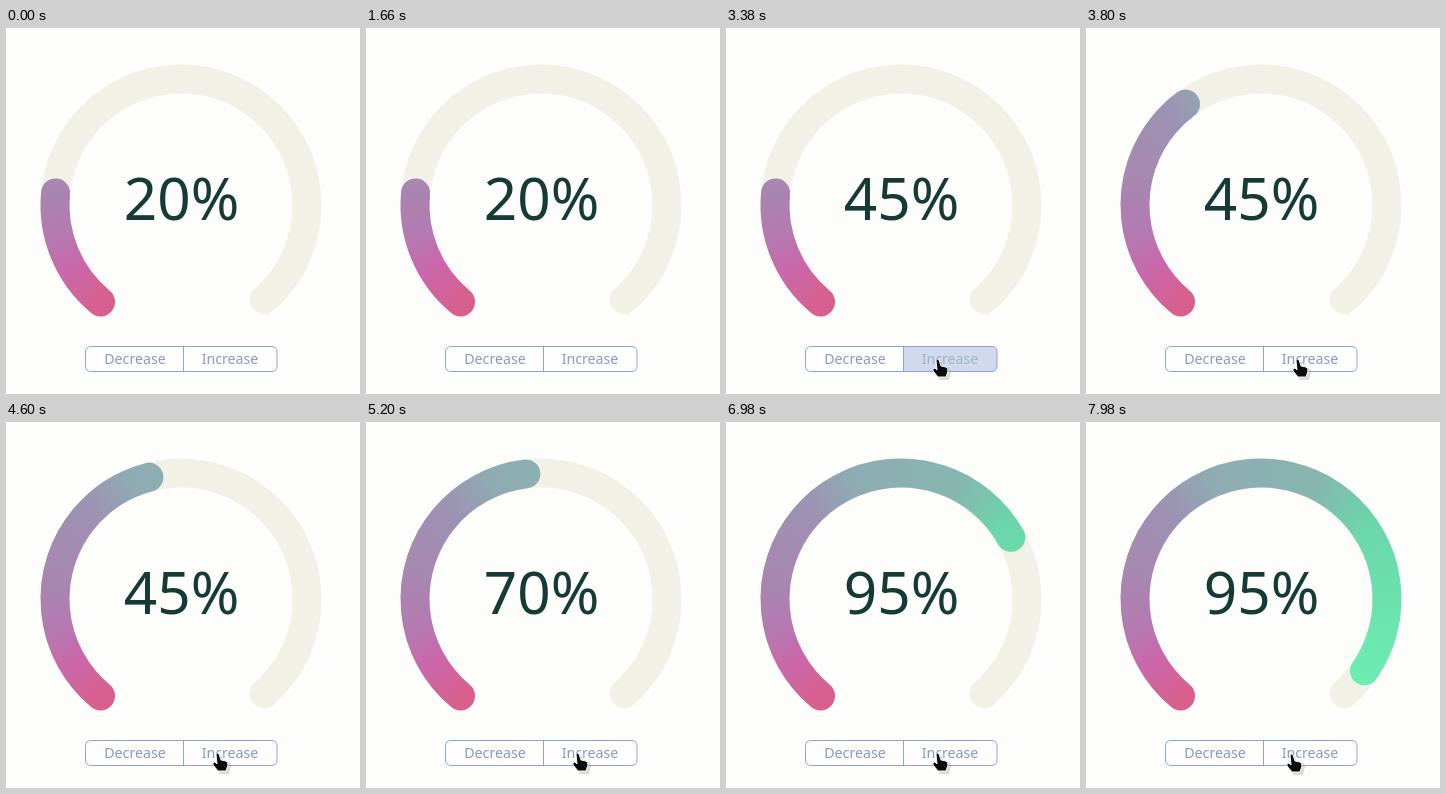
Recreate the animation shown at these times as an HTML page with a canvas. Size 354x366 px, loop 8000 ms.

```html
<!DOCTYPE html>
<html lang="en">
<head>
<meta charset="utf-8">
<title>Dashboard progress</title>
<style>
  html, body { margin: 0; width: 100%; height: 100%; overflow: hidden; background: #fdfdfc; }
  canvas, svg { position: absolute; left: 0; top: 0; display: block; }
  text { font-family: "Noto Sans", "Open Sans", sans-serif; text-anchor: middle; }
</style>
</head>
<body>
<canvas id="gauge" width="354" height="366"></canvas>
<svg width="354" height="366">
  <text id="label" x="175.5" y="192" font-size="58.5" fill="#163a36">20%</text>
  <path id="pressed" d="M177.5 318.5H266a5 5 0 0 1 5 5V338.5a5 5 0 0 1-5 5H177.5Z" fill="#d0d9ee"/>
  <g fill="none" stroke="#8fa0da">
    <rect x="79.5" y="318.5" width="191.5" height="25" rx="5"/>
    <path d="M177.5 318.5V343.5"/>
  </g>
  <g font-size="14.2" fill="#889ac4">
    <text x="129" y="336">Decrease</text>
    <text id="increase" x="224" y="336">Increase</text>
  </g>
  <g id="cursor" stroke-linejoin="round">
    <g id="hand">
      <path d="M-1 1Q1-1 2 1L4 6 10 7Q12 8 12 11L11 15 10 19H1L-4 12Q-6 9-3 9L0 11Z" fill="#778" opacity=".25" transform="translate(1 1)"/>
      <path d="M-2 0Q0-2 1 0L3 6 8 7Q10 8 10 11L9 14 8 17H0L-5 11Q-6 8-3 8L-1 10Z" fill="#0b0c0c" stroke="#f6f6f2"/>
    </g>
    <path id="arrow" d="M0 0V16L4 12.5 6.5 18 9 17 6.5 11.5H11.5Z" fill="#0b0c0c" stroke="#f6f6f2"/>
  </g>
</svg>
<script>
const LOOP = 8000, DURATION = 1000;
const CX = 175, CY = 177, RADIUS = 126, START = 129.7, SWEEP = 279;
const $ = id => document.getElementById(id);
const ctx = $('gauge').getContext('2d');

// press: button turns grey; move: bar starts, just after the label changes
const LABEL_LEAD = 60;
const clicks = [
  { press: 3200, move: 3400, value: 45 },
  { press: 4880, move: 5090, value: 70 },
  { press: 6600, move: 6890, value: 95 }
];
// time, x, y of the pointer tip
const route = [
  [1640, 166, 372], [1960, 238, 164], [2360, 212, 332],
  [7700, 212, 332], [7980, 206, 333]
];

const clamp = v => Math.max(0, Math.min(1, v));
const lerp = (a, b, p) => a + (b - a) * p;
const smooth = p => p * p * (3 - 2 * p);
const radians = degrees => degrees * Math.PI / 180;

// cubic-bezier(.25, .1, .25, 1)
function ease(x) {
  if (x <= 0 || x >= 1) return clamp(x);
  const bezier = (a, b, s) => 3 * a * s * (1 - s) ** 2 + 3 * b * s * s * (1 - s) + s ** 3;
  let lo = 0, hi = 1;
  for (let i = 0; i < 20; i++) {
    const mid = (lo + hi) / 2;
    if (bezier(.25, .25, mid) < x) lo = mid; else hi = mid;
  }
  return bezier(.1, 1, lo);
}

// The gradient begins a little early to cover the round cap.
const CAP = 15;
const paint = ctx.createConicGradient(radians(START - CAP), CX, CY);
[[0, '#d7608e'], [0.07, '#cb67aa'], [0.13, '#b579b0'], [0.2, '#a985b0'],
 [0.34, '#9d92b3'], [0.42, '#8fabb2'], [0.6, '#86b7af'],
 [0.7, '#6bd6ab'], [1, '#6cf0b2']]
  .forEach(([p, color]) => paint.addColorStop((p * SWEEP + CAP) / 360, color));

function arc(percent, color) {
  ctx.beginPath();
  ctx.arc(CX, CY, RADIUS, radians(START), radians(START + SWEEP * percent / 100));
  ctx.strokeStyle = color;
  ctx.stroke();
}

function drawCursor(t) {
  let [, x, y] = route[0];
  for (let i = 1; i < route.length; i++) {
    const [t0, x0, y0] = route[i - 1], [t1, x1, y1] = route[i];
    if (t < t0) break;
    const p = smooth(clamp((t - t0) / (t1 - t0)));
    x = lerp(x0, x1, p);
    y = lerp(y0, y1, p);
  }
  const overButton = x > 79 && x < 271 && y > 318 && y < 344;
  $('cursor').setAttribute('transform', `translate(${x} ${y})`);
  $('hand').style.display = overButton ? '' : 'none';
  $('arrow').style.display = overButton ? 'none' : '';
}

function draw(t) {
  let bar = 20, shown = 20, grey = 0;
  for (const c of clicks) {
    bar = lerp(bar, c.value, ease((t - c.move) / DURATION));
    if (t >= c.move - LABEL_LEAD) shown = c.value;
    grey = Math.max(grey, Math.min(clamp((t - c.press) / 80), clamp((c.move + 80 - t) / 80)));
  }
  ctx.clearRect(0, 0, 354, 366);
  ctx.lineWidth = 29;
  ctx.lineCap = 'round';
  arc(100, '#f2f1e8');
  arc(bar, paint);
  $('label').textContent = shown + '%';
  $('pressed').style.opacity = grey;
  $('increase').setAttribute('fill', grey > .5 ? '#a0b1c8' : '#889ac4');
  drawCursor(t);
}

const begin = performance.now();
function tick() {
  draw((performance.now() - begin) % LOOP);
  requestAnimationFrame(tick);
}
tick();
</script>
</body>
</html>
```
